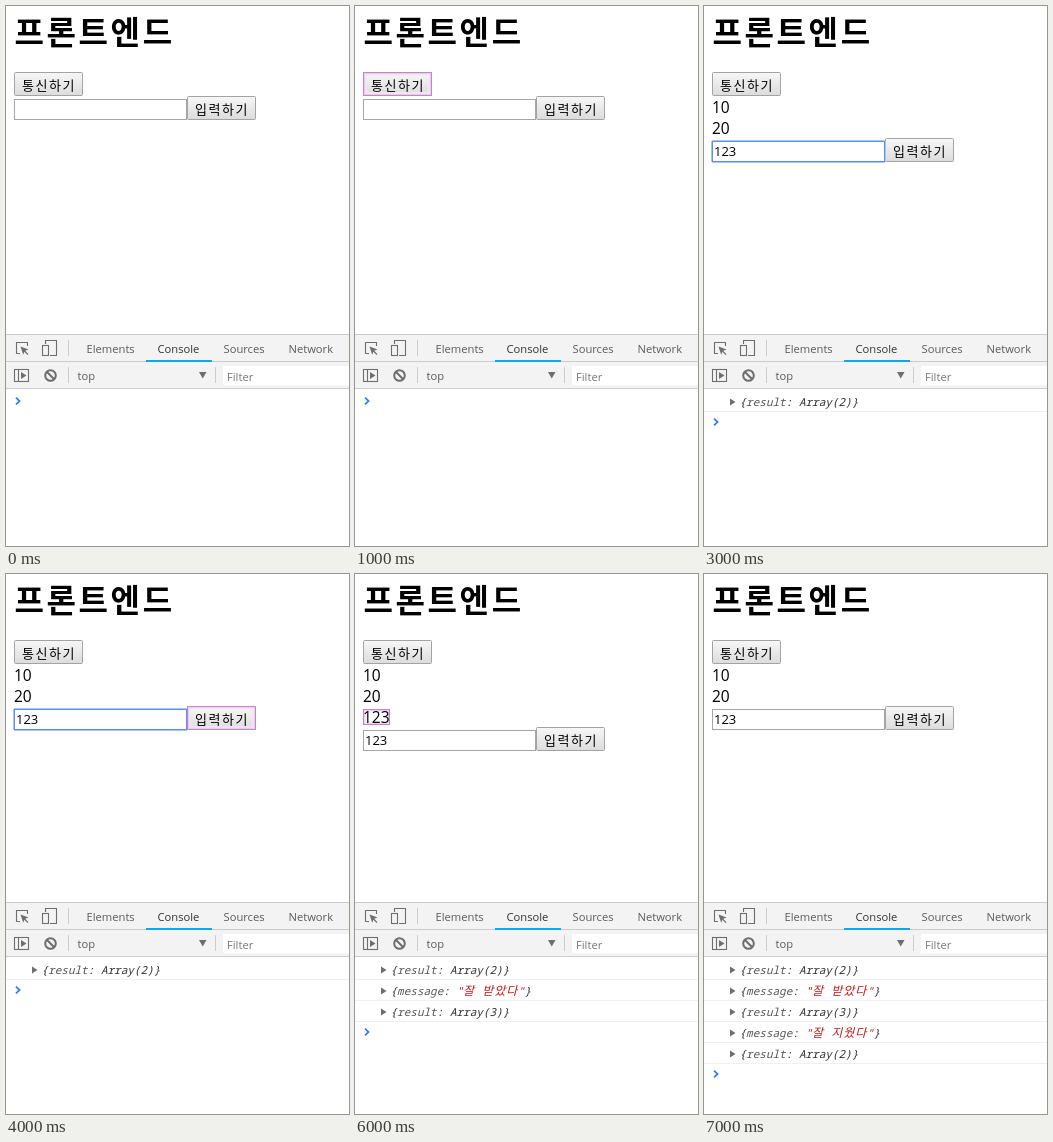
An HTML page that plays this animation: 343x540 px, repeating every 8000 ms.

```html
<!DOCTYPE html>
<html lang="ko">
<head>
<meta charset="utf-8">
<style>
  html, body { margin: 0; width: 100%; height: 100%; overflow: hidden; background: #fff; }
  svg { display: block; width: 343px; height: 540px; }
  text { white-space: pre; }
  .ko { font-family: "Noto Sans CJK KR", "Noto Sans CJK", sans-serif; }
  .h1 { font-size: 32px; font-weight: 700; letter-spacing: 2.6px; }
  .btn { font-size: 13px; letter-spacing: 1.5px; }
  .item { font: 15.5px "Open Sans", "Noto Sans", sans-serif; }
  .field { font: 13px "Open Sans", "Noto Sans", sans-serif; }
  .ui { font: 11.2px "Open Sans", "Noto Sans", sans-serif; fill: #5a5a5a; }
  .on { fill: #333; }
  .hint { fill: #777; }
  .mono { font: italic 11px "Noto Sans Mono", monospace; fill: #303030; }
  .str { font-size: 12px; font-style: italic; letter-spacing: .96px; word-spacing: 2.95px; }
  .red { fill: #c41a16; }
  .icon { fill: none; stroke: #6e6e6e; stroke-width: 1.1; }
</style>
</head>
<body>
<svg viewBox="0 0 343 540">
  <defs>
    <linearGradient id="face" x2="0" y2="1">
      <stop stop-color="#f7f7f7"/><stop offset="1" stop-color="#dcdcdc"/>
    </linearGradient>
  </defs>
  <rect width="343" height="540" fill="#fff"/>
  <text class="ko h1" x="8.5" y="38">프론트엔드</text>
  <g id="page"></g>

  <rect y="328" width="343" height="55" fill="#f3f3f3"/>
  <path d="M0 328.5H343M0 355.5H343M0 382.5H343M62.5 334V350M62.5 361V377M209.5 361V377" stroke="#ccc"/>
  <rect x="140" y="354" width="66" height="2" fill="#03a9f4"/>
  <g class="icon">
    <path d="M14 347.5H10.5V336.5H21.5V340"/>
    <path d="M14.5 340.5L22.5 343.5L19.2 344.8L22.5 348.2L21.6 349L18.4 345.7L17.2 348.7Z" fill="#6e6e6e" stroke="none"/>
    <path d="M39.5 338V334.5H50.5V349.5H44"/>
    <rect x="36.5" y="339.5" width="6" height="10"/>
    <rect x="8.5" y="363.5" width="14" height="12"/>
    <path d="M12.5 363.5V375.5"/>
    <path d="M15 366L20.5 369.5L15 373Z" fill="#6e6e6e" stroke="none"/>
    <circle cx="44.5" cy="369.5" r="5.3" stroke-width="2"/>
    <path d="M40.8 365.8L48.2 373.2" stroke-width="2"/>
  </g>
  <path d="M193 366H200.5L196.75 372.5Z" fill="#6e6e6e"/>
  <rect x="217" y="360" width="126" height="19" fill="#fff"/>
  <g class="ui">
    <text x="80.5" y="347">Elements</text>
    <text class="on" x="151.5" y="347">Console</text>
    <text x="217.5" y="347">Sources</text>
    <text x="282.5" y="347">Network</text>
    <text x="71.5" y="374">top</text>
    <text class="hint" x="221" y="375">Filter</text>
  </g>
  <g id="log"></g>
</svg>
<script>
const LOOP = 8000, STEP = 1000, ROW = 21, CHAR = 6.6;
const page = document.getElementById('page');
const log = document.getElementById('log');

const logs = [['Array(2)'], ['', '잘 받았다'], ['Array(3)'], ['', '잘 지웠다'], ['Array(2)']];

// One entry per second; missing keys mean off or empty.
const scenes = [
  { items: [], rows: 0 },
  { items: [], rows: 0, mark: 'fetch' },
  { items: [10, 20], rows: 1, caret: true },
  { items: [10, 20], rows: 1, value: '123', focus: true },
  { items: [10, 20], rows: 1, value: '123', focus: true, mark: 'enter' },
  { items: [10, 20, 123], rows: 3, value: '123' },
  { items: [10, 20, 123], rows: 3, value: '123', mark: 'item' },
  { items: [10, 20], rows: 5, value: '123' }
];

const text = (cls, x, y, s) => `<text class="${cls}" x="${x}" y="${y}">${s}</text>`;
const box = (x, y, w, h, attrs) =>
  `<rect x="${x + .5}" y="${y + .5}" width="${w - 1}" height="${h - 1}" ${attrs}/>`;

const button = (x, y, label) =>
  box(x, y, 69, 24, 'rx="1" fill="url(#face)" stroke="#a3a3a3"') +
  text('ko btn', x + 8, y + 18, label);

// Outline with a pale glow that fades inwards.
const highlight = (x, y, w, h) =>
  ['#c583c8', '#e8cdec', '#f3e4f6', '#f4ebf6'].map((color, i) =>
    box(x + i, y + i, w - 2 * i, h - 2 * i,
      `fill="none" stroke="${color}" stroke-opacity="${1 - i * .15}"`)).join('');

function input(y, value = '', focus) {
  const glow = focus ? box(7, y - 1, 175, 23, 'rx="1.5" fill="none" stroke="#a9c4f5"') : '';
  const stroke = focus ? '#5d8fee' : '#a6a6a6';
  return glow + box(8, y, 173, 21, `fill="#fff" stroke="${stroke}"`) +
    text('field', 10, y + 15, value);
}

function logRow([array, message], i) {
  const y = 400 + i * ROW, x = 35.5;
  const at = n => x + n * CHAR;
  const arrow = `<path d="M26 ${y - 7.5}L31.5 ${y - 4}L26 ${y - .5}Z" fill="#6e6e6e"/>`;
  const line = `<path d="M0 ${y + 5.5}H343" stroke="#f0f0f0"/>`;
  const key = name => `{<tspan fill="#565656">${name}</tspan>: `;
  const body = array
    ? text('mono', x, y, key('result') + array + '}')
    : text('mono', x, y, key('message')) +
      text('mono red', at(10), y, '"') +
      text('ko str red', at(11), y, message) +
      text('mono red', at(19.3), y, '"') +
      text('mono', at(20.3), y, '}');
  return line + arrow + body;
}

function draw(s) {
  const top = 90 + s.items.length * ROW;
  const marks = {
    fetch: [8, 66, 69, 24],
    enter: [181, top, 69, 24],
    item: [8, 135, 27, 16]
  };
  page.innerHTML = button(181, top, '입력하기') +
    input(top + 3, s.value, s.focus) +
    (s.mark ? highlight(...marks[s.mark]) : '');
  page.innerHTML += s.items.map((n, i) => text('item', 8, 107 + i * ROW, n)).join('');
  page.innerHTML = button(8, 66, '통신하기') + page.innerHTML;
  if (s.mark === 'fetch') page.innerHTML += highlight(...marks.fetch);

  const y = 395 + s.rows * ROW;
  log.innerHTML = logs.slice(0, s.rows).map(logRow).join('') +
    `<path d="M10 ${y - 3.3}L13.6 ${y}L10 ${y + 3.3}" fill="none" stroke="#367cf1" stroke-width="1.7"/>` +
    (s.caret ? `<path d="M24.5 ${y - 7}V${y + 7}" stroke="#000"/>` : '');
}

const start = performance.now();
let shown = -1;
function tick() {
  const i = Math.floor((performance.now() - start) % LOOP / STEP);
  if (i !== shown) draw(scenes[shown = i]);
  requestAnimationFrame(tick);
}
tick();
</script>
</body>
</html>
```
